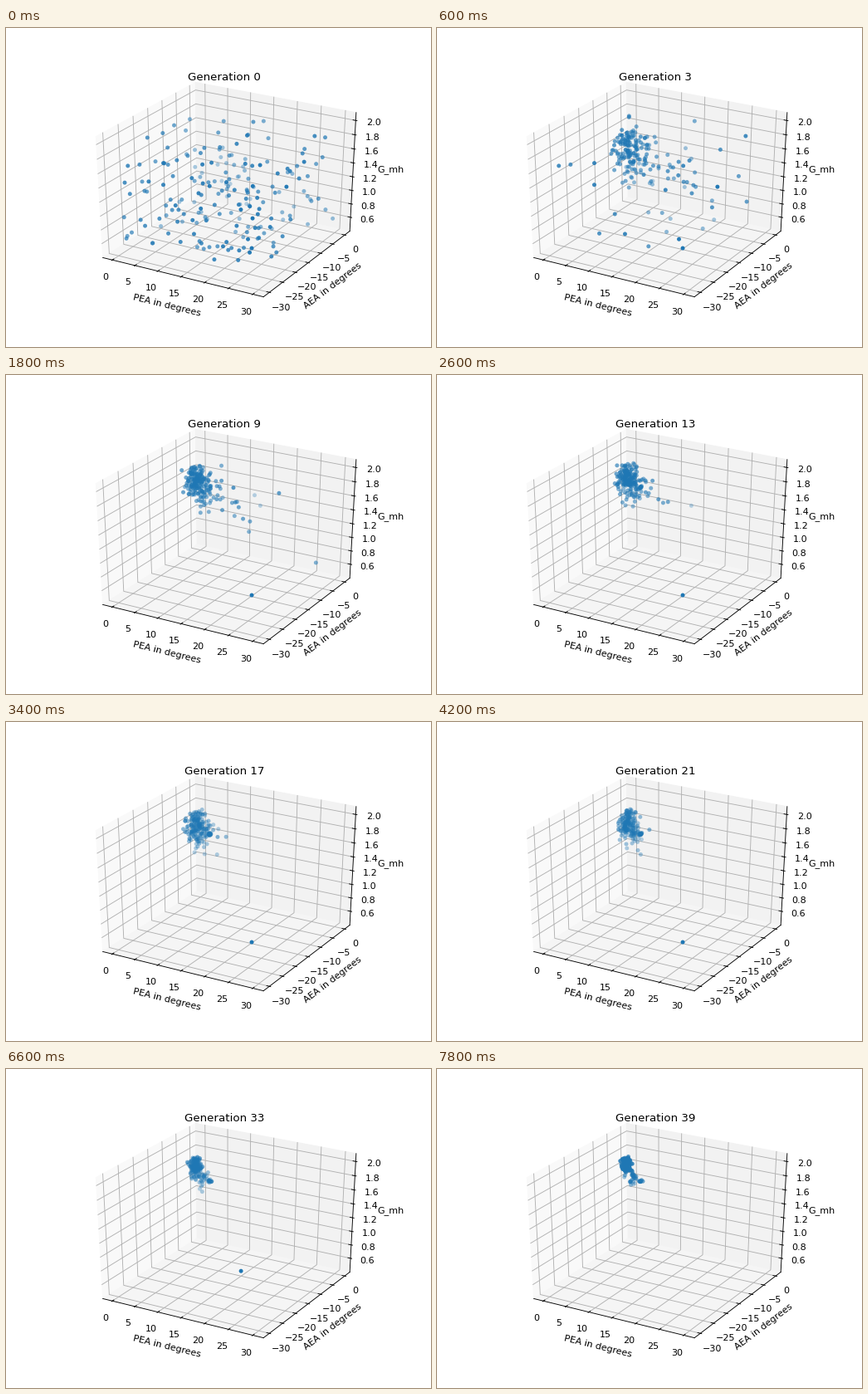
Recreate the animation shown at these times as a matplotlib script. Size 512 px wide and 384 px high, loop 8 s.

```python
import numpy as np
import matplotlib.pyplot as plt
from matplotlib.animation import FuncAnimation

W, H, DPI = 512, 384, 80
GENS, STEP, POP = 40, 200, 200
BLUE = (0x1f / 255, 0x77 / 255, 0xb4 / 255)

plt.rcParams["font.family"] = "DejaVu Sans"
fig = plt.figure(figsize=(W / DPI, H / DPI), dpi=DPI, facecolor="white")
ax = fig.add_axes([0, 0, 1, 1])
ax.set_xlim(0, W)
ax.set_ylim(H, 0)
ax.axis("off")

# ---------- perspective box ----------
LO, HI = -1 / 48, 49 / 48          # padded unit cube
TICK_IN, TICK_OUT = 0.2 / 12, 0.1 / 12
TEXT_GAP, NAME_GAP = 0.0738, 0.1605


def nearness(p):
    x, y, z = np.asarray(p, float).T - 0.5
    return np.sqrt(3) / 4 * x - 0.75 * y + 0.5 * z


def project(p):
    """Unit-cube points to stage pixels (elevation 30, azimuth -60)."""
    x, y, z = np.asarray(p, float).T - 0.5
    c = np.sqrt(3) / 2
    right = c * x + 0.5 * y
    up = -0.25 * x + c / 2 * y + c * z
    depth = 10 - nearness(p)
    px = 64 + (right / depth + 0.095) / 0.185 * 0.775 * W
    py = H - (0.11 * H + (up / depth + 0.095) / 0.185 * 0.77 * H)
    return px, py


def path(points, **kw):
    ax.plot(*project(points), **kw)


def pane(points, grey):
    ax.fill(*project(points), color=str(grey), lw=0.8, zorder=0)


pane([(LO, LO, LO), (LO, HI, LO), (LO, HI, HI), (LO, LO, HI)], 0.975)
pane([(LO, HI, LO), (HI, HI, LO), (HI, HI, HI), (LO, HI, HI)], 0.95)
pane([(LO, LO, LO), (HI, LO, LO), (HI, HI, LO), (LO, HI, LO)], 0.9625)


def draw_axis(name, ticks, limits, fmt, edge, grid, tick_dir, outward):
    tick_dir, outward = np.array(tick_dir), np.array(outward)
    lo, hi = limits
    path([edge(LO), edge(HI)], color="black", lw=0.8, zorder=2)
    for value in ticks:
        t = (value - lo) / (hi - lo)
        e = np.array(edge(t))
        path(grid(t), color="#b0b0b0", lw=0.8, zorder=1)
        path([e - TICK_IN * tick_dir, e + TICK_OUT * tick_dir],
             color="black", lw=0.8, zorder=2)
        label = fmt.format(value).replace("-", "\u2212")
        ax.text(*project(e + TEXT_GAP * outward), label, fontsize=10,
                ha="center", va="top")
    (x0, x1), (y0, y1) = project([edge(LO), edge(HI)])
    angle = np.degrees(np.arctan2(y0 - y1, x1 - x0)) if len(name) > 4 else 0
    ax.text(*project(np.array(edge(0.5)) + NAME_GAP * outward), name,
            fontsize=10, ha="center", va="center", rotation=angle,
            rotation_mode="anchor")


draw_axis("PEA in degrees", range(0, 31, 5), (-1.43, 31.5), "{:d}",
          lambda t: (t, LO, LO),
          lambda t: [(t, LO, LO), (t, HI, LO), (t, HI, HI)],
          (0, -1, 0), (0, -1, -1))
draw_axis("AEA in degrees", range(-30, 1, 5), (-31.5, 1.5), "{:d}",
          lambda t: (HI, t, LO),
          lambda t: [(HI, t, LO), (LO, t, LO), (LO, t, HI)],
          (1, 0, 0), (1, 0, -1))
draw_axis("G_mh", np.arange(0.6, 2.1, 0.2), (0.425, 2.075), "{:.1f}",
          lambda t: (HI, HI, t),
          lambda t: [(LO, LO, t), (LO, HI, t), (HI, HI, t)],
          (1, 0, 0), (1, 1, 0))

title = ax.text(263.2, 63, "", fontsize=12, ha="center", va="baseline")

# ---------- population, in unit-cube coordinates ----------
rng = np.random.default_rng(5)
BEST = np.array([0.2, 0.64, 0.945])
NICHE = (0.3, 0.64, 0.77)

# isolated survivors: position, first and last generation
LONERS = [((0.90, 0.76, 0.91), 0, 5),
          ((0.85, 0.79, 0.54), 0, 4),
          ((0.75, 0.75, 0.76), 2, 5),
          ((0.70, 0.72, 0.79), 6, 11),
          ((0.40, 0.98, 0.57), 2, 10),
          ((0.45, 0.96, 0.50), 1, 15),
          ((0.90, 0.06, 0.315), 0, 24),
          ((0.85, 0.03, 0.47), 25, 33)]


def at(g, *values):
    return np.interp(g, [1, 3, 9, 21, 39], values)


def founders(n):
    """Uniform settings; the reachable height falls off from the optimum."""
    a, b = rng.uniform(0.05, 0.95, (2, n))
    cap = 0.95 - 0.1 * (a - BEST[0])**2 - 0.9 * (b - BEST[1])**2
    z = 0.05 + (cap - 0.05) * rng.random(n)
    return np.column_stack([a, b, z])


def offspring(g, n):
    """Positions drawn from the cluster as it looks in generation g."""
    k = at(g, 1.8, 1.3, 1, 0.75, 0.4)
    tail = at(g, 0.08, 0.05, 0.012, 0.005, 0.002) * rng.exponential(1, n)**2
    wing = rng.random(n) < at(g, 0.1, 0.15, 0.25, 0.2, 0.1)
    a = BEST[0] + rng.normal(0, 0.02 * k, n) + tail + 0.04 * wing
    b = BEST[1] + rng.normal(0, 0.045 * k, n)
    z = rng.normal(at(g, 0.64, 0.70, 0.82, 0.85, 0.89),
                   at(g, 0.12, 0.075, 0.06, 0.06, 0.035), n)
    z = BEST[2] - np.abs(BEST[2] - z) - 0.35 * tail - 0.1 * wing
    pos = np.column_stack([np.clip(a, 0.05, 0.95), b, z])
    settled = rng.random(n) < at(g, 0, 0, 0.03, 0.07, 0.05)
    pos[settled] = rng.normal(NICHE, 0.006, (settled.sum(), 3))
    return pos


def evolve():
    pos = founders(POP)
    history = [pos.copy()]
    for g in range(1, GENS):
        new = rng.random(POP) < 0.5
        pos[new] = offspring(g, new.sum())
        history.append(pos.copy())
    return history


HISTORY = evolve()
dots = ax.scatter([], [], s=20, linewidths=0, zorder=3)


def draw(g):
    alive = [p for p, first, last in LONERS if first <= g <= last]
    pos = np.vstack([HISTORY[g]] + alive)
    near = nearness(pos)
    order = np.argsort(near)
    pos, near = pos[order], near[order]
    # far points fade
    alpha = 0.3 + 0.7 * (near - near[0]) / (near[-1] - near[0])
    dots.set_offsets(np.column_stack(project(pos)))
    dots.set_facecolor(np.column_stack([np.tile(BLUE, (len(pos), 1)), alpha]))
    title.set_text(f"Generation {g}")
    return dots, title


anim = FuncAnimation(fig, draw, frames=GENS, interval=STEP, repeat=True,
                     repeat_delay=0, blit=False)
plt.show()
```
